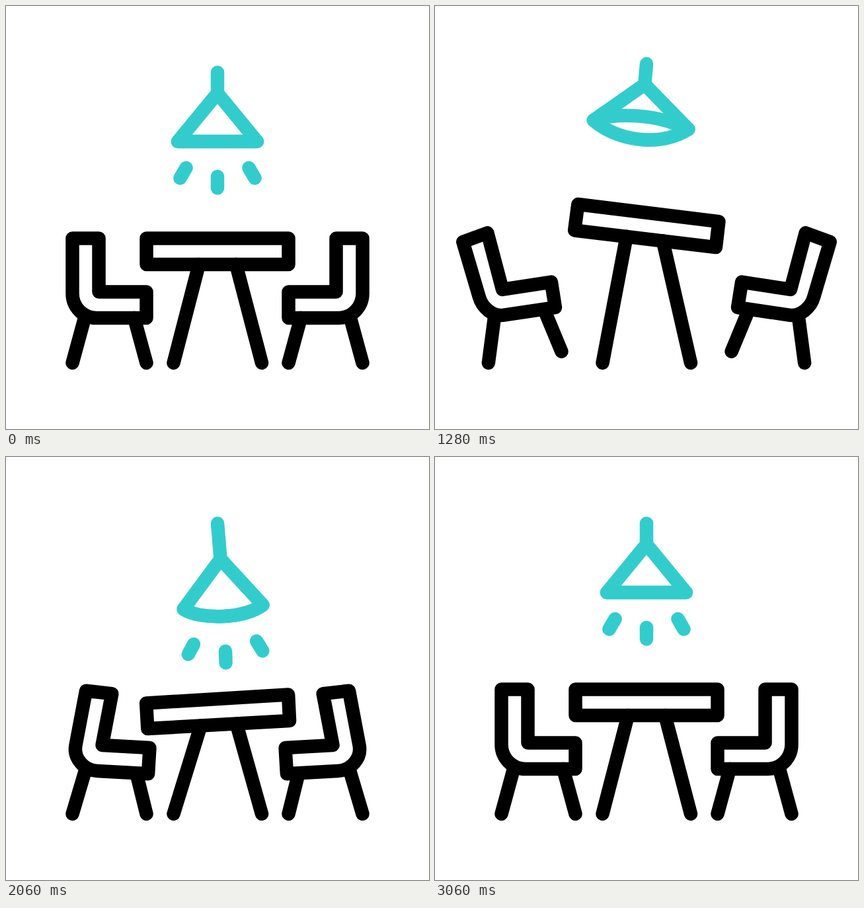
Write an HTML page without scripts that moves like this. It is 640 by 640 pixels and loops after 3600 ms.

```html
<!DOCTYPE html>
<html lang="en">
<head>
<meta charset="utf-8">
<title>Dining table</title>
<style>
html, body { margin: 0; width: 100%; height: 100%; overflow: hidden; background: #fff; }
svg { display: block; width: 100%; height: 100%; }
path { fill: none; stroke: #000; stroke-width: 20.5; stroke-linecap: round; stroke-linejoin: round; }

/* every path has three poses: --r rest, --a lifted, --b dropped */
path { d: var(--r); animation: sway 3.6s infinite; }
.lamp path { stroke: #3cc; animation-delay: -60ms; }

@keyframes sway {
  0% { d: var(--r); animation-timing-function: cubic-bezier(.82, 0, .5, 1); }
  27.778%, 29.444% { d: var(--a); animation-timing-function: cubic-bezier(.82, 0, .7, 1); }
  52.778% { d: var(--b); animation-timing-function: cubic-bezier(.2, 0, .05, 1); }
  85%, 100% { d: var(--r); }
}

/* rays shrink towards their upper end and grow back */
.lamp .ray {
  stroke-dasharray: 1 3;
  animation: sway 3.6s -60ms infinite, trim 3.6s var(--wait, 0s) linear infinite;
}
@keyframes trim {
  0%, 3% { stroke-dashoffset: 0; }
  11.5%, 47.222% { stroke-dashoffset: 1.01; }
  53.333%, 100% { stroke-dashoffset: 0; }
}

.seat {
  --r: path("M100.5 351.5L140.5 351.5L140.5 432.5L212.5 432.5L212.5 472L137 472C116.8 472 100.5 455.5 100.5 435Z");
  --a: path("M38.5 357L75.5 342.5L100 428.5L174 416.5L180.5 455L101 467.5C86 469 70 457 65 440Z");
  --b: path("M128.5 354.5L167.5 360.5L147.3 437.3L219.2 442.7L216 482L138 476C118 474.5 103 456 107 438Z");
}
.back-leg {
  --r: path("M119 472L100.5 540");
  --a: path("M88.5 472L80 540");
  --b: path("M119.5 478L100.5 540");
}
.front-leg {
  --r: path("M194 472L212.5 540");
  --a: path("M166 464L190.5 522");
  --b: path("M199 483L212.5 540");
}
.top {
  --r: path("M212.5 351.5L427.5 351.5L427.5 391L212.5 391Z");
  --a: path("M216.5 296.5L429.5 324.5L424.7 363.5L211 336Z");
  --b: path("M212 380L427 362.5L429.6 402L215 418.3Z");
}
.left-leg {
  --r: path("M292 391L253.5 540");
  --a: path("M289.5 346L253.5 540");
  --b: path("M295.5 412.5L253.5 540");
}
.right-leg {
  --r: path("M348 391L387 540");
  --a: path("M344.5 353L387 540");
  --b: path("M349 408.5L387 540");
}
.cord {
  --r: path("M320 100.5L320 132");
  --a: path("M320 86.5L316.5 114.5");
  --b: path("M320 100.5L328 171");
}
.shade {
  --r: path("M260 205L320 132L380 205C340 205 300 205 260 205Z");
  --a: path("M237 167L316.5 114.5L382.5 182.5C335 210 272 197 237 167Z");
  --b: path("M275 249L328 171L395 238C372 276 288 277 275 249Z");
}
.rim {
  --r: path("M260 205C300 205 340 205 380 205");
  --a: path("M237 167C272 152 333 154 382.5 182.5");
  --b: path("M275 249C288 277 372 276 395 238");
}
.ray1 {
  --r: path("M272.5 245L263.5 260.5");
  --a: path("M259 210L245 223");
  --b: path("M292.5 312L285 327");
}
.ray2 {
  --wait: 20ms;
  --r: path("M320 258L320 275.5");
  --a: path("M313 228L310 245");
  --b: path("M341 320.5L342 338.5");
}
.ray3 {
  --wait: 45ms;
  --r: path("M367.5 245L376.5 260.5");
  --a: path("M363 222L371 237");
  --b: path("M387.5 303.5L397 318");
}
</style>
</head>
<body>
<svg viewBox="0 0 640 640">
  <g>
    <path class="back-leg"/>
    <path class="front-leg"/>
    <path class="seat"/>
  </g>
  <g transform="matrix(-1 0 0 1 640 0)">
    <path class="back-leg"/>
    <path class="front-leg"/>
    <path class="seat"/>
  </g>
  <g>
    <path class="left-leg"/>
    <path class="right-leg"/>
    <path class="top"/>
  </g>
  <g class="lamp">
    <path class="cord"/>
    <path class="shade"/>
    <path class="rim"/>
    <path class="ray ray1" pathLength="1"/>
    <path class="ray ray2" pathLength="1"/>
    <path class="ray ray3" pathLength="1"/>
  </g>
</svg>
</body>
</html>
```
